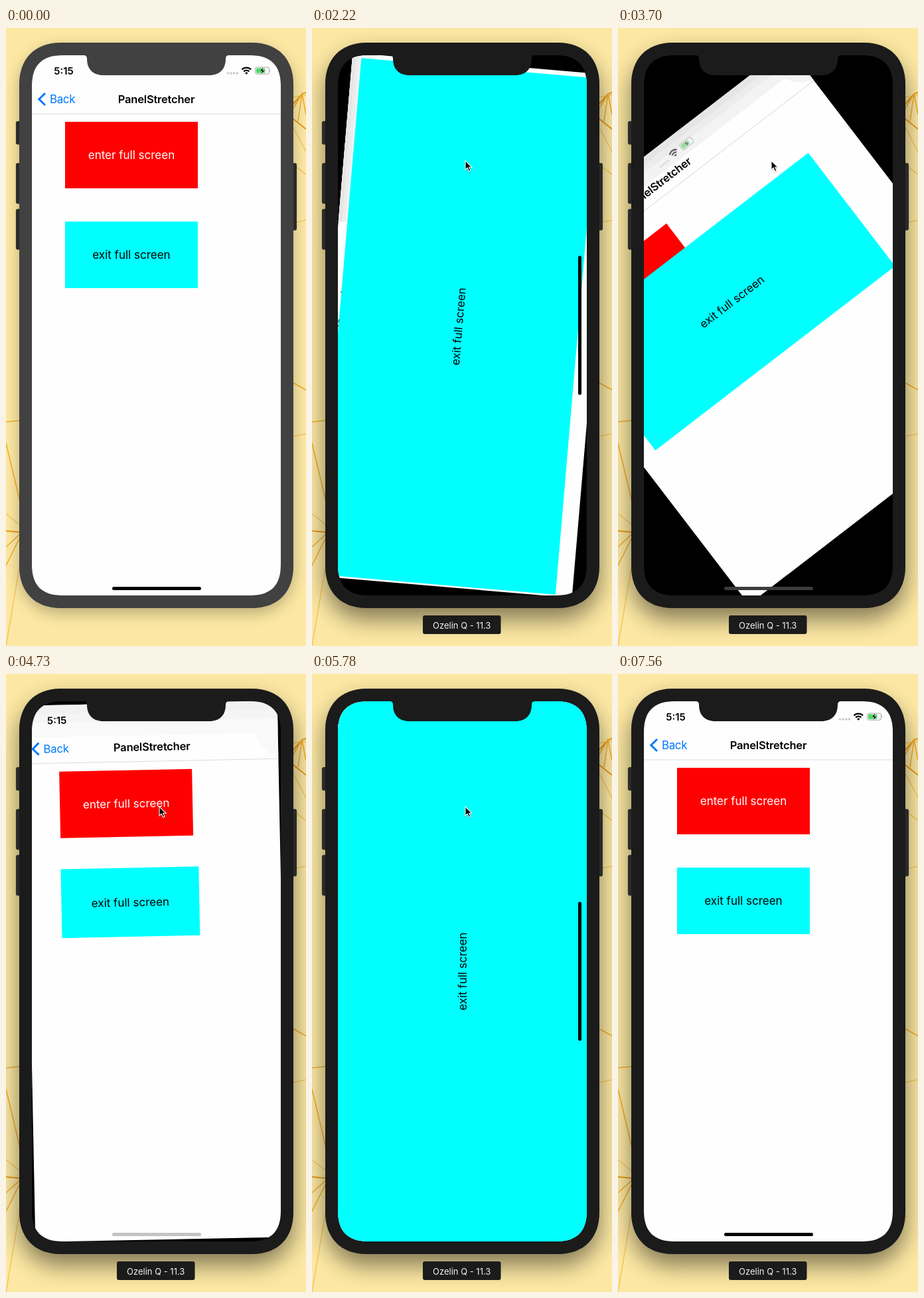
An HTML page for the animation above (7710 ms loop, 452 px wide and 929 px high).

```html
<!DOCTYPE html>
<html lang="en">
<head>
<meta charset="utf-8">
<title>Rotating panel</title>
<style>
  html, body { margin: 0; width: 100%; height: 100%; overflow: hidden; background: #fce8a3; }
  svg { display: block; width: 100vw; height: 100vh; }
  text { font-family: Inter, Roboto, "Liberation Sans", sans-serif; font-size: 17px; }
  .mid { text-anchor: middle; }
</style>
</head>
<body>
<svg viewBox="0 0 452 929" preserveAspectRatio="none">
  <defs>
    <clipPath id="glass">
      <path d="M85 41H368C399 41 414 56 414 87V807C414 838 399 853 368 853H85C54 853 39 838 39 807V87C39 56 54 41 85 41Z"/>
    </clipPath>
    <filter id="wide" x="-30%" y="-20%" width="160%" height="140%"><feGaussianBlur stdDeviation="17"/></filter>
    <filter id="tight" x="-30%" y="-20%" width="160%" height="140%"><feGaussianBlur stdDeviation="11"/></filter>
    <filter id="soft" x="-50%" y="-50%" width="200%" height="200%"><feGaussianBlur stdDeviation="1"/></filter>
  </defs>

  <rect width="452" height="929" fill="#fce8a3"/>
  <g fill="none" stroke="#f0ad2e" stroke-width="1.6">
    <path d="M0 756L22 758M432 115L446 99L452 97M432 136L452 152" stroke="#e89a14" stroke-width="2"/>
    <path d="M0 624L22 716M0 592L22 590M0 780L22 760M0 808L22 764M432 122L446 99L452 130M446 99L440 140M432 533L452 544"/>
    <path d="M0 730L22 748M0 929L22 800M432 148L452 186M432 614L452 610M432 293L452 289M432 205L452 220M432 104L452 101" stroke-opacity=".55"/>
  </g>

  <rect id="shadeOff" x="20" y="30" width="413" height="850" rx="60" opacity=".26" filter="url(#tight)"/>
  <rect id="shadeOn" x="20" y="39" width="413" height="850" rx="60" opacity=".48" filter="url(#wide)"/>

  <g fill="#2a2a2a" stroke="#1a1a1a" stroke-width=".8">
    <rect x="15.4" y="140.4" width="8" height="34.4" rx="2"/>
    <rect x="15.4" y="203.4" width="8" height="60.4" rx="2"/>
    <rect x="15.4" y="272.4" width="8" height="60.4" rx="2"/>
    <rect x="429.6" y="203.4" width="8" height="100.4" rx="2"/>
  </g>
  <path id="bezel" d="M82 22H371C411 22 433 48 433 84V810C433 846 411 872 371 872H82C42 872 20 846 20 810V84C20 48 42 22 82 22Z"/>

  <g clip-path="url(#glass)">
    <rect x="39" y="41" width="375" height="812"/>
    <g id="page">
      <rect id="paper" fill="#fefefe"/>
      <g id="haze">
        <rect id="haze0" fill="#f3f3f3"/>
        <rect id="haze1" fill="#ececec"/>
        <rect id="haze2" fill="#e5e5e5"/>
        <path id="hazeEnd" fill="#f3f3f3"/>
      </g>
      <rect id="rule" height="1" fill="#dcdcdc"/>
      <g id="back" fill="#007aff">
        <path d="M20 -9L10.8 0L20 9" fill="none" stroke="#007aff" stroke-width="3"/>
        <text x="27" y="6.2" letter-spacing="-.4">Back</text>
      </g>
      <text id="title" class="mid" style="font-size:16.5px;font-weight:600" letter-spacing="-.2">PanelStretcher</text>
      <text id="clock" class="mid" x="48" y="28.5" style="font-size:15px;font-weight:600">5:15</text>
      <g id="icons">
        <g id="dots" fill="#c9c9c9"></g>
        <g fill="none" stroke="#000" stroke-width="2.4">
          <path d="M316.6 21.4A9.4 9.4 0 0 1 330 21.4M319.3 24.3A5.6 5.6 0 0 1 327.3 24.3"/>
        </g>
        <path d="M323.3 28.8L321 26.5A3.3 3.3 0 0 1 325.6 26.5Z"/>
        <rect x="336.5" y="18" width="21" height="10.2" rx="2.8" fill="none" stroke="#a0a0a0"/>
        <rect x="338" y="19.5" width="13.5" height="7.2" rx="1.4" fill="#4cd964"/>
        <path d="M358.7 21.3Q360.2 23.1 358.7 24.9Z" fill="#a0a0a0"/>
        <path d="M348.6 17.8L343.2 23.7H346.6L345.4 28.6L351 22.4H347.5Z" stroke="#fff" stroke-width=".5"/>
      </g>
      <rect x="50" y="100" width="200" height="100" fill="#f00"/>
      <text class="mid" x="150" y="156.2" fill="#fff">enter full screen</text>
      <rect id="panel" fill="#0ff"/>
      <text id="panelText" class="mid">exit full screen</text>
    </g>
    <rect id="barLow" x="160" y="840" width="134" height="5" rx="2.5"/>
    <rect id="barSide" x="401" y="342.5" width="5" height="209" rx="2.5"/>
  </g>
  <path id="notch" d="M117 40V41Q122 41 122 46C122 62 131 71 147 71H306C322 71 331 62 331 46Q331 41 336 41V40Z"/>

  <g id="tag">
    <rect x="167" y="883" width="117.5" height="28" rx="3" fill="#1b1b1b"/>
    <text class="mid" x="225.7" y="902.6" fill="#f2f2f2" style="font-size:13px">Ozelin Q - 11.3</text>
  </g>
  <g id="cursor">
    <path d="M1 2V16L4.2 13L6.8 18.6L9.4 17.5L7 12H11.2Z" opacity=".35" filter="url(#soft)"/>
    <path d="M1 1V14.6L4.2 11.6L6.6 17L9 16L6.7 10.8H11Z" stroke="#fff" stroke-width="1.1"/>
  </g>
</svg>
<script>
const LOOP = 7710, STEP = 147.14, TURN = 965;
const BEATS = [0, 450, 1340, 3260, 4730, 6230];
// start of each turn; even ones enter full screen, odd ones leave it
const TURNS = [1416, 3172, 4652, 6141];

const $ = id => document.getElementById(id);
const set = (id, attrs) => { for (const k in attrs) $(id).setAttribute(k, attrs[k]); };
const clamp = v => Math.max(0, Math.min(1, v));
const lerp = (a, b, p) => a + (b - a) * p;
const show = (id, on) => set(id, { opacity: +on });

for (let i = 0; i < 4; i++) {
  const dot = document.createElementNS('http://www.w3.org/2000/svg', 'circle');
  dot.setAttribute('cx', 295.4 + i * 4.6);
  dot.setAttribute('cy', 27);
  dot.setAttribute('r', 1.8);
  $('dots').append(dot);
}

// cubic-bezier(.42, 0, .58, 1), solved by bisection
function ease(x) {
  x = clamp(x);
  let lo = 0, hi = 1;
  for (let i = 0; i < 24; i++) {
    const u = (lo + hi) / 2, v = 1 - u;
    if (1.26 * u * v * v + 1.74 * u * u * v + u * u * u < x) lo = u; else hi = u;
  }
  return lo * lo * (3 - 2 * lo);
}

function hold(t) {
  const beat = BEATS.filter(b => b <= t).pop();
  return beat + Math.floor((t - beat + 4) / STEP) * STEP;
}

function turnAt(t) {
  let p = 0, leaving = false;
  TURNS.forEach((start, i) => {
    if (t < start) return;
    const k = t >= start + TURN ? 1 : ease((t - start) / TURN);
    leaving = i % 2 === 1;
    p = leaving ? 1 - k : k;
  });
  return { p, leaving };
}

function drawPage(p, leaving) {
  const w = lerp(375, 812, p), h = lerp(812, 375, p);
  const nav = lerp(88, 32, p), mid = lerp(66, 16, p);
  set('page', { transform: `translate(226.5 447) rotate(${-90 * p}) translate(${-w / 2} ${-h / 2})` });
  set('paper', { width: w, height: h });
  set('rule', { y: nav - .5, width: w });
  set('back', { transform: `translate(0 ${mid})` });
  set('title', { x: w / 2, y: mid + 6 });

  const from = w * .76 * clamp(p * 2 - 1);
  [.55, .3, .15].forEach((part, i) => set('haze' + i, { x: from, width: w - from, height: nav * part }));
  set('hazeEnd', { d: `M${w} ${nav * .3}V${nav - 1}Q${w - 32} ${nav - 14} ${w - 40} ${nav * .3}Z` });
  set('haze', { opacity: p > 0 ? clamp(.4 + p * 10) : 0 });

  set('clock', { opacity: leaving ? 1 - p : 1 });
  set('icons', { opacity: leaving || p === 0 ? 1 - p : 0 });

  const x = lerp(50, 0, p), y = lerp(250, 0, p);
  const pw = lerp(200, 812, p), ph = lerp(100, 375, p);
  set('panel', { x, y, width: pw, height: ph });
  set('panelText', { x: x + pw / 2, y: y + ph / 2 + 6.2 });

  const grey = leaving ? 60 * clamp(p / .4) : 0;
  set('barLow', {
    fill: `rgb(${grey},${grey},${grey})`,
    opacity: leaving ? clamp((.7 - p) * 5) : clamp(1 - p * 60)
  });
  set('barSide', { opacity: clamp((p - .6) * 5) });
}

function drawCursor(t) {
  const come = 1 - (1 - clamp((t - 450) / 441)) ** 2;
  const leave = ease((t - 6800) / 460);
  let x = lerp(365, 230, come), y = lerp(540, 198.5, come);
  x = lerp(x, 418, leave);
  y = lerp(y, 915, leave);
  if (t > 7390) y += 4;
  set('cursor', { transform: `translate(${x} ${y})`, opacity: +(t >= 450 && t < 7540) });
}

function draw(now) {
  const t = hold(now % LOOP);
  const active = t >= 1340;
  const { p, leaving } = turnAt(t);
  drawPage(p, leaving);
  drawCursor(t);
  show('tag', t >= 450);
  show('shadeOn', active);
  show('shadeOff', !active);
  if (active) set('shadeOn', { opacity: .48 });
  else set('shadeOff', { opacity: .26 });
  const tone = active ? '#1b1b1b' : '#414141';
  set('bezel', { fill: tone });
  set('notch', { fill: tone });
}

const begin = performance.now();
function tick() {
  draw(performance.now() - begin);
  requestAnimationFrame(tick);
}
tick();
</script>
</body>
</html>
```
